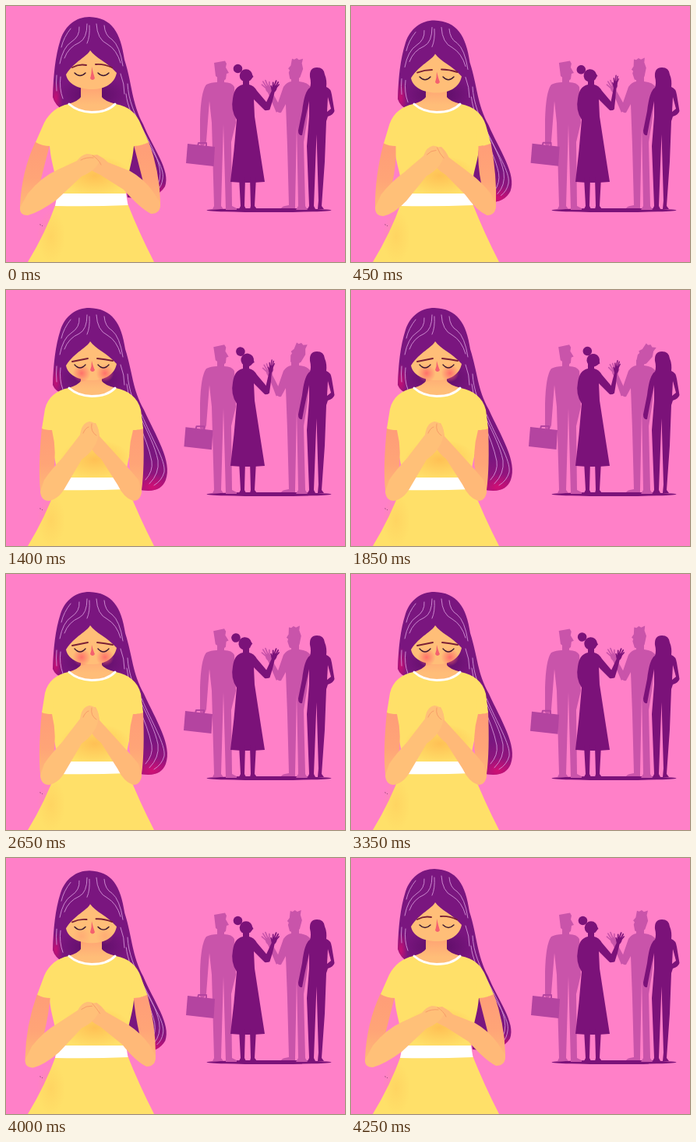
Write an HTML page that moves like this. It is 435 px wide and 329 px high and loops after 4300 ms.

```html
<!DOCTYPE html>
<html lang="en">
<head>
<meta charset="utf-8">
<title>Lonely in company</title>
<style>
html, body { margin: 0; width: 100%; height: 100%; overflow: hidden; background: #ff80c8 }
svg { display: block; width: 100vw; height: 100vh }
.line { fill: none; stroke-linecap: round; stroke-linejoin: round }
.pale { fill: #c954aa }
.dark { fill: #7b1279 }
.strand { stroke: #d393d6; stroke-width: .9 }
</style>
</head>
<body>
<svg viewBox="0 0 435 329">
  <defs>
    <linearGradient id="skin" x1="0" y1="0" x2="0" y2="1">
      <stop offset="0" stop-color="#ff9d78"/><stop offset=".5" stop-color="#ffa477"/><stop offset="1" stop-color="#ffbd78"/>
    </linearGradient>
    <linearGradient id="neck" x1="0" y1="0" x2="0" y2="1">
      <stop offset=".2" stop-color="#ffa574"/><stop offset=".75" stop-color="#ffbd78"/>
    </linearGradient>
    <linearGradient id="hair" gradientUnits="userSpaceOnUse" x1="120" y1="20" x2="190" y2="250">
      <stop offset="0" stop-color="#7a167f"/><stop offset=".85" stop-color="#7a167f"/><stop offset="1" stop-color="#9c147d"/>
    </linearGradient>
    <radialGradient id="blush"><stop offset="0" stop-color="#ff6868" stop-opacity=".9"/><stop offset="1" stop-color="#ff6868" stop-opacity="0"/></radialGradient>
    <radialGradient id="glow"><stop offset="0" stop-color="#ffab48" stop-opacity=".6"/><stop offset="1" stop-color="#ffab48" stop-opacity="0"/></radialGradient>
    <radialGradient id="red"><stop offset="0" stop-color="#e50d70" stop-opacity=".7"/><stop offset="1" stop-color="#e50d70" stop-opacity="0"/></radialGradient>
    <radialGradient id="shade"><stop offset="0" stop-color="#570c62" stop-opacity=".9"/><stop offset="1" stop-color="#570c62" stop-opacity="0"/></radialGradient>
    <clipPath id="hairClip"><path id="hairEdge"/></clipPath>
  </defs>

  <!-- talking group -->
  <ellipse class="dark" cx="337.500" cy="262.500" rx="80" ry="2.600"/>
  <g class="pale">
    <path id="headL" d="M267 73L281 70.500L283 74L282 79L286 86L283 87L282 94Q278 98 274 94L269 90Z"/>
    <path d="M271 90H280V98Q290 98 293 104L295 150L289 175L290 257L296 260V262H282L279 152L276 257L279 261H265L267 257L264 150L261 122L257 174Q254 183 249 178L249 146Q250 110 257 101Q263 98 271 98Z"/>
  </g>
  <g id="bag">
    <path class="line" stroke="#b444a0" stroke-width="2" d="M246 180L247 176H257V180"/>
    <path fill="#b444a0" d="M233 177L268 181L266.500 206L231 202Z"/>
  </g>

  <g class="pale">
    <path id="headR" d="M365 68L368 69L371 67L374 69L379 67L378 73L380 80L377 91Q371 98 364 94L362 86L363 83L361 81L364 77Z"/>
    <path d="M366 90H376V97Q388 98 391 105L386 150L382 175L384 257L387 262H372L375 257L373 152L371 257V260H353Q354 257 363 256L361 180L359 126L353 137Q349 138 346 133L356 104Q360 98 366 97Z"/>
    <g id="armR">
      <path d="M-4 1L-2.500 -28H2.500L4 1Z"/>
      <ellipse cy="-30" rx="3.600" ry="5"/>
      <path class="line" stroke="#c954aa" stroke-width="1.700" d="M-2 -32L-5 -39M-1 -33L-2 -42M1 -33L1.500 -42M2 -32L5 -38M2 -28L6 -32"/>
    </g>
  </g>

  <g class="dark">
    <g id="headB"><circle cx="308" cy="89.500" r="8.300"/><path d="M314 85L317.500 91L314 94Z"/><circle cx="297.500" cy="80.500" r="5.800"/></g>
    <path d="M304 92H312V101Q318 102 322 109L338 128Q339 135 332 134L318 120L319 142Q326 188 332 226Q310 228 288 226Q293 185 296 146Q288 134 291 119Q293 103 304 101Z"/>
    <path d="M299 220H307L306 257L308 261H299L301 257ZM313 220H321L319 257L322 261H313L314 257Z"/>
    <g id="armB">
      <path d="M-4 1Q-3 -15 -2 -27H2Q4 -12 4 1Q0 5 -4 1Z"/>
      <ellipse cy="-30" rx="3.400" ry="5"/>
      <path class="line" stroke="#7b1279" stroke-width="1.700" d="M-2 -32L-4 -38M-1 -33L-1 -42M1 -33L2 -41M2 -32L4 -38M-2 -28L-5 -32"/>
    </g>
    <path d="M390 91Q389 79 399 79Q408 79 409 88Q412 95 411 104Q417 106 418 114L421.500 135Q420 140 413 142L411 148L409 200L405 257L408 261H400L401 250L398.500 165L395 257L397 261H387L389 257L386 180L389 142V122L383 150L380 166Q375 167 375 160L380 135Q383 109 390 105Q392 99 390 91Z"/>
  </g>
  <path fill="#ff80c8" d="M413 117L417 132L412 136Z"/>

  <!-- praying woman -->
  <path id="hairBack" fill="url(#hair)"/>
  <g clip-path="url(#hairClip)">
    <ellipse cx="64" cy="118" rx="9" ry="24" fill="url(#red)"/>
    <ellipse id="tailTint" cx="188" rx="24" ry="17" fill="url(#red)"/>
    <ellipse cx="112" cy="114" rx="45" ry="24" fill="url(#shade)"/>
  </g>
  <path id="tailStrands" class="line strand"/>
  <path fill="url(#neck)" d="M96 98V117Q93 122 80 126Q92 137 110 137Q130 137 141 126Q126 122 123 117V98Z"/>
  <path id="dress" fill="#ffe069"/>
  <ellipse cx="114" cy="218" rx="46" ry="26" fill="url(#glow)"/>
  <path class="line" stroke="#fff" stroke-width="3" d="M81 126Q92 136 110 136.500Q130 136.500 140 126"/>
  <path fill="#ffe069" d="M64 254Q51 291 28 329H190Q171 292 156 254Z"/>
  <ellipse cx="58" cy="296" rx="18" ry="34" fill="url(#glow)" opacity=".35"/>
  <path fill="#fff" d="M66 241H154L156.500 256Q110 258 63 257Z"/>
  <path id="upperL" fill="url(#skin)"/>
  <path id="upperR" fill="url(#skin)"/>
  <path id="foreR" fill="#ffb978"/>
  <path id="foreL" fill="#ffc078"/>
  <path id="sleeves" fill="#ffe069"/>
  <path id="fingers" class="line" stroke="#f79c68" stroke-width="1"/>
  <path fill="#9b497b" d="M43 280l2 1l-1 1zM46 282h1v1h-1z"/>

  <g id="head">
    <path class="line strand" d="M104 23Q104 42 94 47Q80 53 75 67M94 27Q95 39 84 46Q73 53 69 74M83 29Q74 40 71 53M107 25Q108 39 104 48M116 23Q117 43 130 49Q142 56 147 73M126 25Q127 38 136 43Q146 51 150 77M65 89Q64 99 65 109M70 91Q68 106 73 119M147 87Q152 100 152 113"/>
    <path fill="#ffbe78" d="M108 57C103 66 89 70 77 88C79 100 93 107 110 107C127 107 139 100 142 86C130 72 115 67 108 57Z"/>
    <g id="cheeks"><circle cx="97" cy="98" r="11.500" fill="url(#blush)"/><circle cx="127" cy="98" r="11.500" fill="url(#blush)"/></g>
    <path id="brows" class="line" stroke="#7a2035" stroke-width="1.900"/>
    <path id="eyes" class="line" stroke="#3b1730" stroke-width="1.400"/>
    <path id="nose" fill="#f4606f"/>
  </g>
</svg>
<script>
const LOOP = 4300;
const $ = id => document.getElementById(id);
const set = (id, name, value) => $(id).setAttribute(name, value);
const ease = (a, b, t) => {
  const u = Math.max(0, Math.min(1, (t - a) / (b - a)));
  return u * u * (3 - 2 * u);
};
const number = /-?\d+(\.\d+)?/g;

// Blend two paths that share the same commands.
function blend(from, to, p) {
  const ends = to.match(number);
  let i = 0;
  return from.replace(number, n => (+n + (ends[i++] - n) * p).toFixed(2));
}

// Eased value through [time, value] pairs.
function keyed(keys, t) {
  const i = Math.max(1, keys.findIndex(k => k[0] >= t));
  const [a, v] = keys[i - 1], [b, w] = keys[i];
  return v + (w - v) * ease(a, b, t);
}

// Open pose, closed pose.
const poses = {
  hairBack: [
    "M107 14C90 14 76 25 70 43C63 65 61 88 60 117Q63 128 74 134L140 136L156 142C155 190 154 232 156 246Q192 251 204 232C212 212 188 182 176 152C161 124 162 100 152 69C147 34 136 15 107 14Z",
    "M107 23C90 23 76 33 70 51C63 73 61 95 60 122Q63 130 74 134L140 136L156 142C155 190 160 240 168 256Q198 263 205 244C214 221 192 187 177 154C162 127 163 108 153 76C148 42 136 24 107 23Z"],
  tailStrands: [
    "M156 100C158 143 190 174 197 208Q200 224 192 234M154 113C157 143 184 176 192 209Q194 221 190 230M173 158C187 188 204 207 201 222Q200 231 195 236",
    "M156 108C158 149 188 184 195 219Q197 236 184 249M155 121C158 151 181 188 187 220Q189 233 179 244M174 160C187 191 205 219 203 234Q200 245 190 251"],
  dress: [
    "M80 126C66 129 56 137 49 150L38 175L56 180C58 204 65 216 66 242H154C155 216 162 204 164 180L183 175L173 152C168 139 158 129 141 126Q130 137 110 137Q92 137 80 126Z",
    "M80 126C65 129 54 137 50 153L46 178L55 180C57 204 65 216 66 242H154C155 216 163 204 165 180L176 178L173 154C169 138 157 129 141 126Q130 137 110 137Q92 137 80 126Z"],
  sleeves: [
    "M57 150L38 175Q46 180 57 180L60 168ZM165 150L183 175Q174 180 163 180L160 168Z",
    "M57 150L46 178Q51 180 59 180L61 168ZM165 150L176 178Q171 180 162 180L160 168Z"],
  upperL: [
    "M38 174Q46 180 56 179Q51 198 45 222L34 266Q18 272 18 257Q20 212 38 174Z",
    "M46 177Q52 180 59 180Q66 209 60 238L57 269Q45 271 44 257Q41 228 46 177Z"],
  upperR: [
    "M183 174Q174 180 164 179Q169 198 175 222L184 265Q199 269 198 251Q197 212 183 174Z",
    "M176 177Q170 180 163 180Q155 209 160 238L163 269Q174 270 174 257Q178 228 176 177Z"],
  foreL: [
    "M18 259Q17 269 28 269Q43 265 65 249L97 219Q116 211 120 199Q114 190 104 190Q97 191 91 199L65 211Q45 220 28 241Z",
    "M44 259Q45 271 55 271Q68 269 77 252L97 218Q117 204 119 184Q118 170 107 169Q97 171 95 186L72 216Q57 232 49 244Z"],
  foreR: [
    "M198 253Q199 267 186 267Q172 260 151 236L121 217Q105 210 99 202Q105 191 117 191Q125 195 131 201L159 212Q177 222 189 239Z",
    "M174 258Q173 271 163 271Q151 267 143 250L122 217Q105 204 104 186Q107 171 115 171Q119 178 120 188L149 220Q162 234 170 244Z"],
  fingers: [
    "M96 198Q103 194 112 195M111 192Q119 197 122 204",
    "M99 184Q102 177 106 176M110 172Q108 182 116 187"],
  brows: [
    "M85 79Q94 74 103 76M115 75Q125 74 136 79",
    "M85 83Q95 81 105 79M117 79Q127 80 137 82"],
  eyes: [
    "M88 86Q95 93 102 86M118 86Q125 93 132 86",
    "M88 87Q95 95 102 87M118 87Q125 95 132 87"],
  nose: [
    "M110 78Q110 87 108 93Q111 97 114 93Q112 87 110 78Z",
    "M110 82Q110 89 108 94Q111 98 114 94Q112 90 110 82Z"]
};

const bunTilt = [[0, 0], [450, -7], [900, 2], [1850, 17], [2650, -8], [3800, 0], [LOOP, 0]];
const wave = [[0, 20], [450, 8], [900, 8], [1850, 11], [2650, 20], [LOOP, 20]];
const manTilt = [[0, 4], [450, -4], [900, 2], [1850, 27], [2650, -4], [3800, -3], [LOOP, 4]];
const manArm = [[0, -26], [900, -26], [1850, -22], [2650, -26], [LOOP, -26]];
const bagShift = [[0, 0], [1850, -3], [2650, -3], [3800, 0], [LOOP, 0]];

function draw(now) {
  const t = now % LOOP;
  const p = ease(0, 900, t) - ease(3450, 4270, t);
  for (const id in poses) set(id, "d", blend(...poses[id], p));
  set("hairEdge", "d", $("hairBack").getAttribute("d"));
  set("tailTint", "cy", 241 + 12 * p);
  set("head", "transform", `translate(0 ${9 * p})`);
  set("cheeks", "opacity", ease(480, 880, t) - ease(3550, 4200, t));

  const angle = keyed(wave, t), shift = keyed(bagShift, t), lean = angle - 8;
  set("headB", "transform", `rotate(${keyed(bunTilt, t)} 307 99)`);
  set("armB", "transform", `translate(335 131) rotate(${angle}) scale(${.75 + lean * .02} ${1 - lean * .01})`);
  set("headR", "transform", `rotate(${keyed(manTilt, t)} 371 97)`);
  set("armR", "transform", `translate(350 134) rotate(${keyed(manArm, t)})`);
  set("headL", "transform", `rotate(${shift * .7} 275 96)`);
  set("bag", "transform", `translate(${shift} ${shift / 3})`);
  requestAnimationFrame(() => draw(performance.now() - start));
}
const start = performance.now();
draw(0);
</script>
</body>
</html>
```
